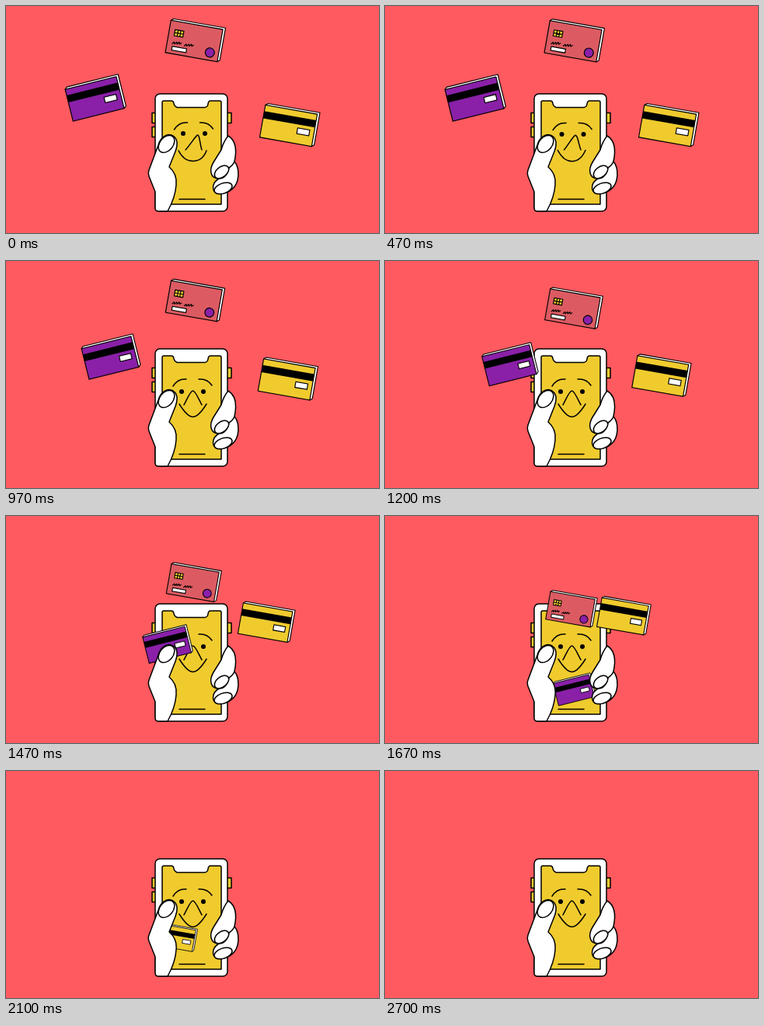
These frames come from a looping animation (480 by 292 pixels, 2.73 s). An HTML page:

```html
<!DOCTYPE html>
<html lang="en">
<head>
<meta charset="utf-8">
<title>Cards into phone</title>
<style>
  html, body { margin: 0; height: 100%; overflow: hidden; background: #ff5a5f; }
  svg { display: block; width: 100%; height: 100%; }
  .ink { stroke: #000; stroke-width: 1.5; stroke-linejoin: round; stroke-linecap: round; }
  .thin { stroke: #000; stroke-width: 1.2; stroke-linejoin: round; }
  .line { fill: none; }
  .white { fill: #fff; }
  .yellow { fill: #f0cb2e; }
</style>
</head>
<body>
<svg viewBox="0 0 480 292">
  <defs>
    <clipPath id="slot"><path d="M0 0h480v255H0z"/></clipPath>
    <g id="body" class="thin">
      <path class="white" d="M-35.500-20l3-2.500h68.500v42.500l-3 2.500z"/>
      <path fill="currentColor" d="M-35.500-20h68.500v42.500h-68.500z"/>
    </g>
    <g id="striped">
      <use href="#body"/>
      <path d="M-35.500-12h68.500v9.500h-68.500z"/>
      <path class="thin white" d="M11 2h16v7.500h-16z"/>
    </g>
  </defs>

  <g class="ink">
    <path class="yellow" d="M188 137.500h6v13h-6zM188 155.500h6v13h-6zM284 137.500h6v13h-6z"/>
    <rect class="white" x="192" y="113" width="93" height="151" rx="6"/>
    <path class="yellow" d="M203 122H213Q215.500 122 216 125.500T220 130.500H256Q259.500 130 260 126T263 122H275Q277 122 277 124V255H201V124Q201 122 203 122z"/>
    <path d="M223 248.500h33"/>
    <path class="line" id="brows" d="M215 161Q221 151 232 152M248 152Q259 151 265 160"/>
    <path class="line" id="mouth"/>
    <path class="line" id="lids" d="M222 172q4.500 6 9 0M249.500 172q4.500 6 9 0"/>
  </g>
  <g id="eyes"><circle cx="226" cy="168" r="3"/><circle cx="254" cy="168" r="3"/></g>

  <g clip-path="url(#slot)">
    <g id="coral" color="#dc5b62">
      <use href="#body"/>
      <path class="thin yellow" d="M-28-9h11.500v8h-11.500zM-24-9v8M-20.500-9v8M-28-5h11.500"/>
      <path class="thin line" d="M-29 10l2.500-3 .8 2.500 2.500-3 .8 2.500 2.500-3 .8 2.500 2.500-2M-13 10l2.500-3 .8 2.500 2.500-3 .8 2.500 2.500-3 .8 2.500 2.500-2"/>
      <path class="thin white" d="M-28 13h19v5h-19z"/>
      <circle class="thin" cx="21.500" cy="12.500" r="6" fill="#8a20a8"/>
    </g>
    <g id="purple" color="#8a20a8"><use href="#striped"/></g>
    <g id="gold" color="#f0cb2e"><use href="#striped"/></g>
  </g>

  <g class="ink white">
    <path d="M196 264Q192 264 192 260V239L184 219Q182.500 215 184 211L196 179C199 168 208 163 215 167C221 171 221 179 218 187L210 207C217 213 220 221 219 230Q218 246 208 264z"/>
    <ellipse class="line" cx="206.500" cy="177.500" rx="12.500" ry="8.500" transform="rotate(-50 206.500 177.500)"/>
    <path d="M286 167C294 172 298 182 294 200C299 206 300 216 298 224C295 236 284 242 274 241C264 241 264 228 274 222C263 222 261 211 267 201L277 185Q280 174 286 167z"/>
    <path class="line" d="M294 200Q292 205 287 208M274 222Q284 222 287 208"/>
    <ellipse cx="277.500" cy="213.500" rx="10.500" ry="6.500" transform="rotate(-38 277.500 213.500)"/>
    <ellipse cx="279.500" cy="234.500" rx="12" ry="6.500" transform="rotate(-20 279.500 234.500)"/>
  </g>
</svg>
<script>
const LOOP = 2730, TRAVEL = 1725;
const $ = id => document.getElementById(id);

// Each card follows a quadratic curve and runs past its end, down through the slot
const cards = [
  { id: 'purple', path: [[115, 118], [230, 143], [250, 248]], delay: 0, angle: -14, shrink: .34 },
  { id: 'coral', path: [[243.5, 44], [242, 80], [239, 132]], delay: 0, angle: 10, shrink: .16 },
  { id: 'gold', path: [[365, 153], [255, 79], [219, 220]], delay: 385, angle: 10, shrink: .34 }
];

const bezier = ([a, b, c], p, axis) =>
  (1 - p) ** 2 * a[axis] + 2 * p * (1 - p) * b[axis] + p * p * c[axis];

function drawCard({ id, path, delay, angle, shrink }, t) {
  const p = (Math.max(0, t - delay) / TRAVEL) ** 4.2;
  const scale = Math.max(0, .99 - shrink * p);
  $(id).setAttribute('transform',
    `translate(${bezier(path, p, 0)} ${bezier(path, p, 1)}) rotate(${angle}) scale(${scale})`);
}

// h is how far the head is turned up and aside: 1 at first, then 0
function drawFace(t) {
  const u = Math.min(1, Math.max(0, (t - 350) / 370)), h = 1 - u * u * (3 - 2 * u);
  const closed = t >= 700 && t < 850;
  const nose = `M${229 + 2 * h} 185C${232 + 4 * h} 180 ${237 + 7 * h} 167 ${240.5 + 6 * h} ${167 - h}` +
    `S${249 + h} 180 252 185`;
  const smile = `M${223 - h} ${184 + 2 * h}C${228 - 2 * h} ${192 + 2 * h} ${234 - 2 * h} ${200.5 - h} 240.5 ${200.5 - h}` +
    `S${253 + 2 * h} ${192 + 2 * h} 258 ${184 + 2 * h}`;
  $('mouth').setAttribute('d', nose + smile);
  $('brows').setAttribute('transform', `translate(${1.5 * h} ${-2 * h})`);
  $('eyes').setAttribute('transform', `translate(${2 * h} ${-4 * h})`);
  $('lids').style.display = closed ? '' : 'none';
  $('eyes').style.display = closed ? 'none' : '';
}

const start = performance.now();
function tick() {
  const t = (performance.now() - start) % LOOP;
  cards.forEach(card => drawCard(card, t));
  drawFace(t);
  requestAnimationFrame(tick);
}
tick();
</script>
</body>
</html>
```
